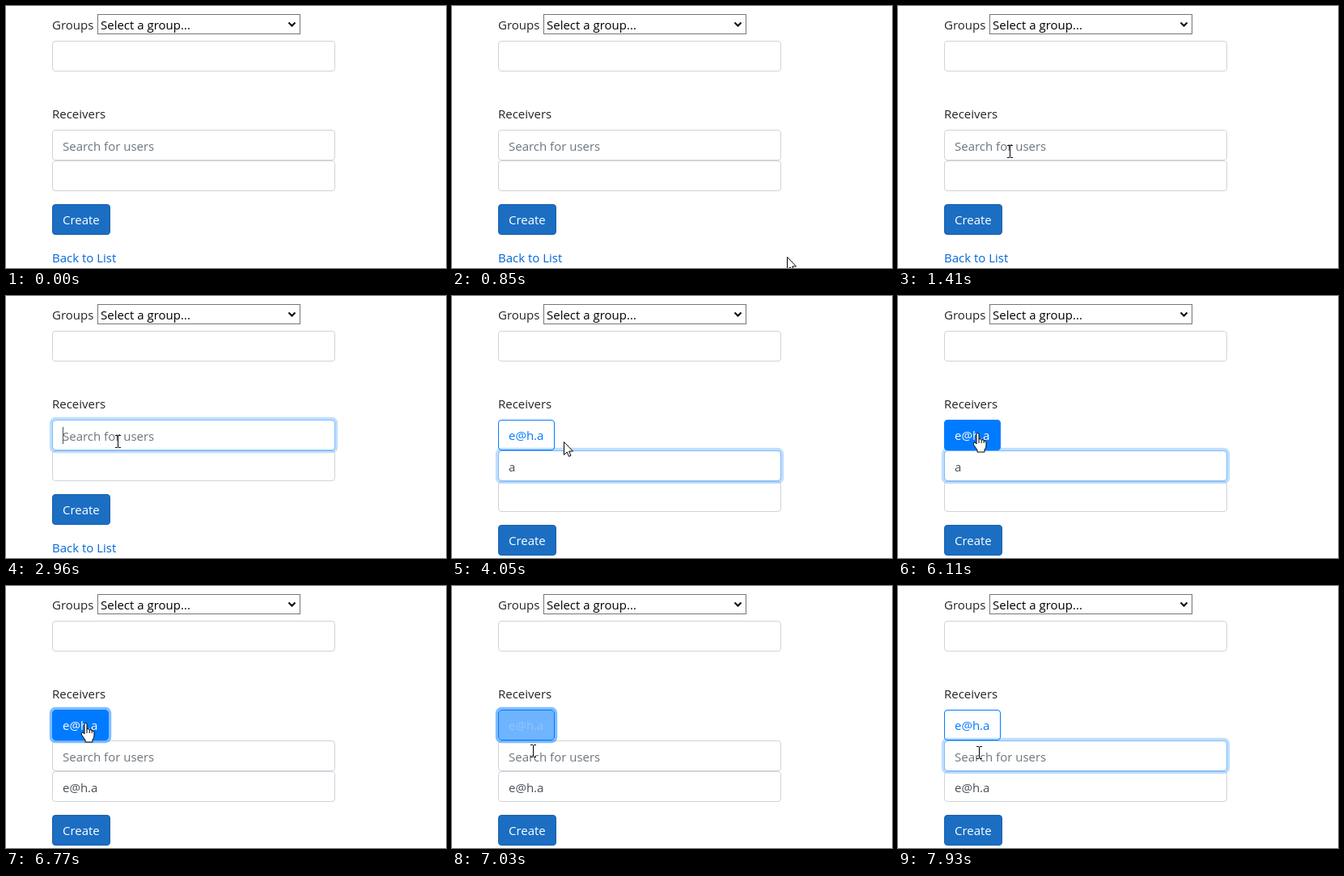
An HTML page that plays this animation: 544x324 px, repeating every 8 s.

```html
<!DOCTYPE html>
<html lang="en">
<head>
<meta charset="utf-8">
<title>Receiver picker</title>
<style>
  html, body { margin: 0; width: 100%; height: 100%; overflow: hidden; background: #fff; }
  svg { display: block; width: 544px; height: 324px; }
  text { font: 15px "Open Sans", "Noto Sans", sans-serif; fill: #212529; white-space: pre; }
  .field { fill: #fff; stroke: #ced4da; }
  .value { fill: #495057; }
  .hint { fill: #6c757d; }
  .ring { fill: none; stroke: #007bff; stroke-width: 3.2; }
  .pointer { fill: #fff; stroke: #000; stroke-linejoin: round; }
</style>
</head>
<body>
<svg viewBox="0 0 544 324">
  <text x="57" y="29">Groups</text>
  <rect x="113.5" y="10.5" width="250" height="24" fill="#fff" stroke="#767676"/>
  <text x="117" y="29" style="fill:#000">Select a group...</text>
  <path d="M349.5 20.5l4 4 4-4" fill="none" stroke="#000" stroke-width="2"/>
  <rect class="field" x="57.5" y="43.5" width="349" height="37" rx="3.5"/>
  <text x="57" y="139">Receivers</text>

  <g id="form">
    <rect class="field" x="57.5" y="191.5" width="349" height="37" rx="3.5"/>
    <text id="chosen" class="value" x="70" y="217">e@h.a</text>
    <rect class="field" x="57.5" y="153.5" width="349" height="37" rx="3.5"/>
    <text id="search" x="70" y="179"></text>
    <rect x="57.5" y="245.5" width="71" height="37" rx="3.5" fill="#1b6ec2" stroke="#1861ac"/>
    <text x="70" y="270" style="fill:#fff">Create</text>
    <text x="57" y="317" style="fill:#0366d6">Back to List</text>
  </g>

  <g id="match">
    <rect id="matchRing" class="ring" x="55.4" y="151.4" width="73.2" height="41.2" rx="5.6"/>
    <rect id="matchBox" x="57.5" y="153.5" width="69" height="37" rx="3.5" stroke="#007bff"/>
    <text id="matchText" x="70" y="178">e@h.a</text>
  </g>

  <g id="focus">
    <rect x="57.5" y="153.5" width="349" height="37" rx="3.5" fill="none" stroke="#80bdff"/>
    <rect class="ring" x="55.4" y="151.4" width="353.2" height="41.2" rx="5.6" stroke-opacity=".25"/>
  </g>
  <rect id="caret" width="1" height="21" fill="#495057"/>

  <g id="cursor">
    <path id="arrow" class="pointer" d="M.5.5V16.5L4.2 13 6.6 18.4 9 17.4 6.7 12H11.5Z"/>
    <path id="beam" fill="none" stroke="#000" d="M-3 -7.5H0M1 -7.5H4M.5 -7V7M-3 7.5H0M1 7.5H4"/>
    <g id="hand">
      <path class="pointer" d="M-1 12V1Q-1 -.5 .5 -.5T2 1V7Q5 5.7 5.2 8Q8 7 8.2 9Q11 8.4 11 11V15Q11 18 9 20V23H0V20.5L-4.2 14.5Q-5.4 12.2 -4 11.2Q-2.5 10.3 -1 13Z"/>
      <path d="M2 7V12M5.2 8V12M8.2 9V12" stroke="#000"/>
    </g>
  </g>
</svg>
<script>
const LOOP = 8000;
const FADE = 150;
const TYPED = 3490, LISTED = 3520, PRESSED = 6210, ADDED = 6300, REFOCUS = 7320;
const caretOn = [[1920, 2450], [2960, 3490], [3490, 4050], [4530, 5060], [5590, 6110], [7400, 7930]];

const inOut = p => p < .5 ? 4 * p ** 3 : 1 - (2 - 2 * p) ** 3 / 2;
const out = p => 1 - (1 - p) ** 3;
const flights = [
  { start: 670, end: 1410, from: [431, 318], to: [138, 180], ease: inOut },
  { start: 4220, end: 4530, from: [138, 180], to: [98, 170], ease: out },
  { start: 6770, end: 7120, from: [98, 170], to: [100, 206], ease: inOut }
];

const el = {};
document.querySelectorAll("[id]").forEach(node => el[node.id] = node);

const set = (node, name, value) => node.setAttribute(name, value);
const show = (node, on) => set(node, "display", on ? "inline" : "none");
const move = (node, x, y) => set(node, "transform", `translate(${x} ${y})`);
const clamp = p => Math.min(1, Math.max(0, p));
const fade = (t, start) => {
  const p = clamp((t - start) / FADE);
  return p * p * (3 - 2 * p);
};
const mix = (a, b, p) => `rgb(${a.map((v, i) => Math.round(v + (b[i] - v) * p))})`;
const WHITE = [255, 255, 255], BLUE = [0, 123, 255];

function cursorAt(t) {
  const { start, end, from, to, ease } = flights.filter(f => t >= f.start).pop() || flights[0];
  const p = ease(clamp((t - start) / (end - start)));
  return from.map((v, i) => Math.round(v + (to[i] - v) * p));
}

function cursorKind(x, y, shift) {
  const inside = (right, top, bottom) => x >= 57 && x < right && y >= top && y < bottom;
  if (shift && inside(127, 153, 191)) return "hand";
  return inside(407, 153 + shift, 229 + shift) ? "beam" : "arrow";
}

function render(t) {
  const shift = t >= LISTED ? 38 : 0;
  const typing = t >= TYPED && t < ADDED;
  move(el.form, 0, shift);
  show(el.chosen, t >= ADDED);
  el.search.textContent = typing ? "a" : "Search for users";
  set(el.search, "class", typing ? "value" : "hint");

  const hover = fade(t, 4240) - fade(t, 6963);
  show(el.match, shift);
  set(el.matchBox, "fill", mix(WHITE, BLUE, hover));
  el.matchText.style.fill = mix(BLUE, WHITE, hover);
  set(el.matchRing, "stroke-opacity", .5 * (fade(t, PRESSED) - fade(t, REFOCUS)));

  move(el.focus, 0, shift);
  set(el.focus, "opacity", fade(t, 1910) - fade(t, PRESSED) + fade(t, REFOCUS));

  show(el.caret, caretOn.some(([a, b]) => t >= a && t < b));
  set(el.caret, "x", typing ? 78 : 70);
  set(el.caret, "y", 162 + shift);

  const [x, y] = cursorAt(t);
  const kind = cursorKind(x, y, shift);
  show(el.cursor, t >= flights[0].start);
  move(el.cursor, x, y);
  for (const name of ["arrow", "beam", "hand"]) show(el[name], name === kind);
}

function tick() {
  render(performance.now() % LOOP);
  requestAnimationFrame(tick);
}
tick();
</script>
</body>
</html>
```
